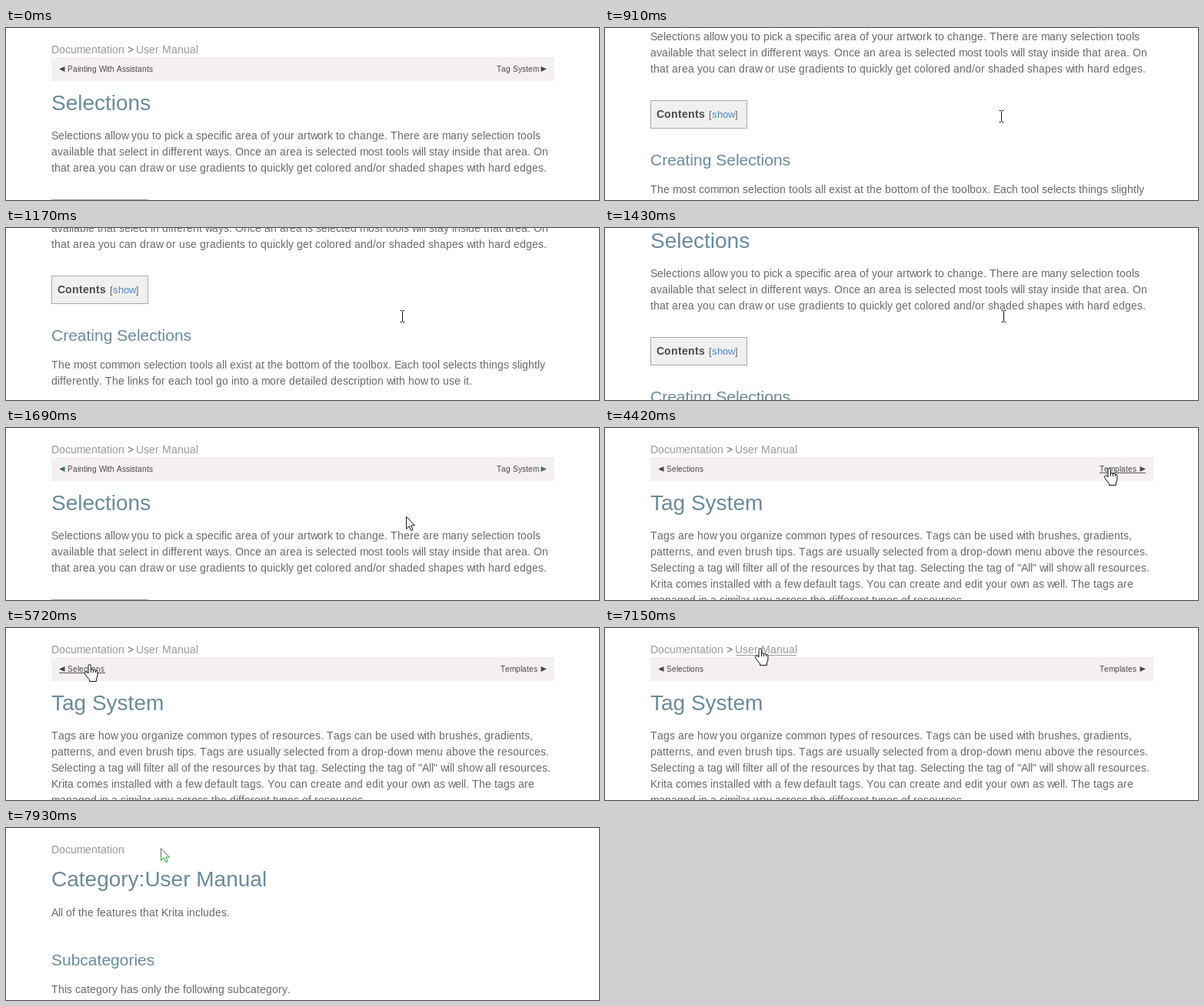
An HTML page that plays this animation: 771 px wide and 224 px high, repeating every 8000 ms.

```html
<!DOCTYPE html>
<html lang="en">
<head>
<meta charset="utf-8">
<title>User Manual</title>
<style>
  html, body { margin: 0; width: 771px; height: 224px; overflow: hidden; background: #fff; }
  svg { display: block; font: 14px "Liberation Sans", Arial, sans-serif; }
  text { white-space: pre; }
  .body { fill: #6a6a6c; }
  .crumb { fill: #999; }
  .h1 { font-size: 28px; fill: #6a8b9b; }
  .h2 { font-size: 21px; fill: #6a8b9b; }
  .nav { font-size: 10px; fill: #484848; }
  .toc { font-weight: bold; fill: #4c4c4c; }
  .show { font-size: 13px; fill: #686868; }
  .blue { fill: #4a88c8; }
  .tip { font: 12px "Open Sans", sans-serif; fill: #575757; }
</style>
</head>
<body>
<svg id="stage" width="771" height="224" viewBox="0 0 771 224"></svg>
<script>
const LOOP = 8000, STEP = 130, SCROLL = 161;
const stage = document.getElementById('stage');
const ruler = document.createElement('canvas').getContext('2d');

function add(parent, tag, attrs, content) {
  const el = document.createElementNS('http://www.w3.org/2000/svg', tag);
  for (const key in attrs) el.setAttribute(key, attrs[key]);
  if (content) el.textContent = content;
  parent.appendChild(el);
  return el;
}

const text = (g, cls, x, y, str) => add(g, 'text', { class: cls, x, y }, str);

// Small text has hinted spacing: every letter starts on a whole pixel
function snapped(g, cls, x, y, str) {
  const el = text(g, cls, x, y, str);
  const style = getComputedStyle(el);
  ruler.font = `${style.fontWeight} ${style.fontSize} ${style.fontFamily}`;
  let pen = x;
  const xs = [...str].map(ch => {
    const left = pen, w = ruler.measureText(ch).width;
    pen += /[mw]/.test(ch) ? Math.floor(w - .2) : Math.round(w);
    return left;
  });
  el.setAttribute('x', xs.join(' '));
}

const lines = (g, y, list) => list.forEach((s, i) => snapped(g, 'body', 59, y + i * 21, s));
const show = (el, on) => el.setAttribute('visibility', on ? 'visible' : 'hidden');

// A link's hover area plus its underline
function link(g, x1, x2, top, bottom, lineY, color) {
  const rule = add(g, 'rect', { x: x1, y: lineY, width: x2 - x1, height: 1, fill: color });
  return { rule, hit: (x, y) => x >= x1 && x <= x2 && y >= top && y <= bottom };
}

function manualPage(title, prev, prevEnd, next, nextX) {
  const g = add(stage, 'g', {});
  snapped(g, 'crumb', 59, 33, 'Documentation');
  snapped(g, 'body', 158, 33, '>');
  snapped(g, 'crumb', 169, 33, 'User Manual');
  add(g, 'rect', { x: 59, y: 38, width: 654, height: 31, fill: '#f4f0ef' });
  const marks = ['M69 53.5L76.5 50V57Z', 'M703 53.5L695.5 50V57Z']
    .map(d => add(g, 'path', { d, fill: '#484848' }));
  snapped(g, 'nav', 80, 57, prev);
  snapped(g, 'nav', nextX, 57, next);
  text(g, 'h1', 59, 107, title);
  return { g, marks, links: [
    link(g, 69, prevEnd, 46, 61, 58, '#555'),
    link(g, nextX, 703, 46, 61, 58, '#555'),
    link(g, 170, 249, 22, 36, 35, '#999')
  ] };
}

const selections = manualPage('Selections', 'Painting With Assistants', 191, 'Tag System', 638);
lines(selections.g, 145, [
  'Selections allow you to pick a specific area of your artwork to change. There are many selection tools',
  'available that select in different ways. Once an area is selected most tools will stay inside that area. On',
  'that area you can draw or use gradients to quickly get colored and/or shaded shapes with hard edges.'
]);
add(selections.g, 'rect', { x: 59.5, y: 223.5, width: 125, height: 36, fill: '#f0f0f0', stroke: '#aaa' });
snapped(selections.g, 'toc', 67, 246, 'Contents');
snapped(selections.g, 'show', 135, 246, '[');
snapped(selections.g, 'show blue', 139, 246, 'show');
snapped(selections.g, 'show', 169, 246, ']');
text(selections.g, 'h2', 59, 308, 'Creating Selections');
lines(selections.g, 344, [
  'The most common selection tools all exist at the bottom of the toolbox. Each tool selects things slightly',
  'differently. The links for each tool go into a more detailed description with how to use it.'
]);

const tags = manualPage('Tag System', 'Selections', 129, 'Templates', 643);
lines(tags.g, 145, [
  'Tags are how you organize common types of resources. Tags can be used with brushes, gradients,',
  'patterns, and even brush tips. Tags are usually selected from a drop-down menu above the resources.',
  'Selecting a tag will filter all of the resources by that tag. Selecting the tag of "All" will show all resources.',
  'Krita comes installed with a few default tags. You can create and edit your own as well. The tags are',
  'managed in a similar way across the different types of resources.'
]);

const category = { g: add(stage, 'g', {}), links: [] };
snapped(category.g, 'crumb', 59, 33, 'Documentation');
text(category.g, 'h1', 59, 76, 'Category:User Manual');
lines(category.g, 115, ['All of the features that Krita includes.']);
text(category.g, 'h2', 59, 179, 'Subcategories');
lines(category.g, 215, ['This category has only the following subcategory.']);

const pages = [selections, tags, category];

const tip = add(stage, 'g', {});
add(tip, 'rect', { x: 201.5, y: 47.5, width: 130, height: 22, fill: '#fff', stroke: '#767676' });
text(tip, 'tip', 206, 63, 'Category:User Manual');

const pointer = add(stage, 'g', {});
const shape = (d, fill) => add(pointer, 'path', { d, fill, stroke: '#111', 'stroke-linejoin': 'round' });
const cursors = {
  arrow: shape('M.5 .5V16.5L4.2 13L6.6 18.6L9 17.6L6.6 12H11.5Z', '#fff'),
  hand: shape('M-1 12V2.2a1.7 1.7 0 0 1 3.4 0V7q2-1 3 .6q2-.8 3 .8q2.5-.6 2.5 2V15q0 2-1.5 4V22.5H.5V20.5' +
    'L-5 13.5Q-6.5 11-4.6 10Q-3 9.5-1 12ZM2.4 7V11M5.4 7.6V11M8.4 8.4V11', '#fff'),
  beam: shape('M-2.5-7.5H-.5L.5-6.5L1.5-7.5H3.5M.5-6.5V6.5M-2.5 7.5H-.5L.5 6.5L1.5 7.5H3.5', 'none')
};
const busy = add(stage, 'linearGradient', { id: 'busy', x1: 0, y1: 0, x2: 0, y2: 1 });
add(busy, 'stop', { offset: .35, 'stop-color': '#666' });
add(busy, 'stop', { offset: .65, 'stop-color': '#1fa32a' });

// time, x, y
const path = [
  [390, 515, 115], [1170, 515, 115], [1690, 520, 115], [1820, 520, 115], [2600, 655, 52],
  [4420, 655, 52], [5200, 100, 57], [5590, 100, 57], [5720, 108, 47], [6240, 201, 26], [LOOP, 201, 26]
];

function ease(t, from, to) {
  const k = Math.min(1, Math.max(0, (t - from) / (to - from)));
  return k * k * (3 - 2 * k);
}

function pointerAt(t) {
  const i = Math.max(1, path.findIndex(p => p[0] > t));
  const [t0, x0, y0] = path[i - 1], [t1, x1, y1] = path[i];
  const k = ease(t, t0, t1);
  return [Math.round(x0 + (x1 - x0) * k), Math.round(y0 + (y1 - y0) * k)];
}

function draw(ms) {
  const t = Math.floor(ms / STEP) * STEP;
  const page = t < 4030 ? selections : t < 7930 ? tags : category;
  pages.forEach(p => p.g.setAttribute('display', p === page ? 'inline' : 'none'));

  const scroll = t < 1300 ? ease(t, 260, 1170) : 1 - ease(t, 1170, 1690);
  selections.g.setAttribute('transform', `translate(0 ${-Math.round(SCROLL * scroll)})`);
  selections.marks.forEach(m => m.setAttribute('fill', t < 1300 ? '#484848' : '#3c7458'));

  const [x, y] = pointerAt(t);
  const loading = t >= 3900 && t < 4420;
  let over = false;
  page.links.forEach(l => {
    const on = t >= 1690 && l.hit(x, y) && !(loading && page === tags);
    show(l.rule, on);
    over = over || on;
  });
  const kind = t < 1690 ? 'beam' : over && !loading ? 'hand' : 'arrow';
  for (const name in cursors) show(cursors[name], t >= 390 && name === kind);
  cursors.arrow.setAttribute('stroke', page === category ? 'url(#busy)' : '#111');
  pointer.setAttribute('transform', `translate(${x} ${y})`);
  show(tip, t >= 6760 && t < 7150);
}

const start = performance.now();
function tick() {
  draw((performance.now() - start) % LOOP);
  requestAnimationFrame(tick);
}
draw(0);
requestAnimationFrame(tick);
</script>
</body>
</html>
```
